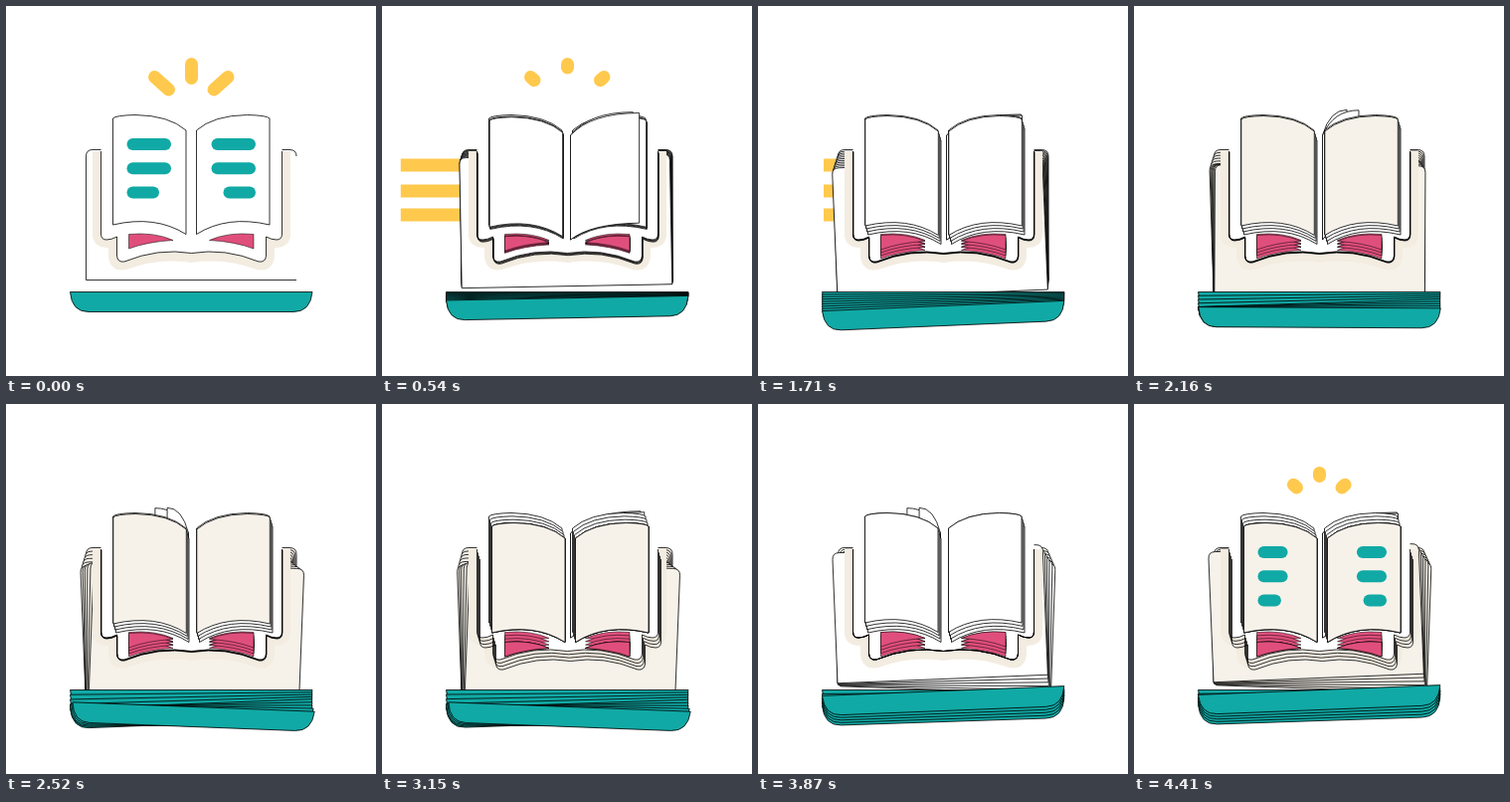
These frames come from a looping animation (372x372 px, 4.5 s). An HTML page with a canvas:

```html
<!DOCTYPE html>
<html>
<head>
<meta charset="utf-8">
<style>
html, body { margin: 0; width: 100%; height: 100%; overflow: hidden; background: #fff; }
canvas { display: block; }
</style>
</head>
<body>
<canvas id="stage" width="372" height="372"></canvas>
<script>
const ctx = document.getElementById('stage').getContext('2d');
const TEAL = '#11a9a5', YELLOW = '#ffc94d', PINK = '#e04f7c', BAND = '#f3ece1', PAPER = '#f6f2ea';
const STEP = 90, COUNT = 50;

// step, laptop dy, tilt, echo dy, base echo tilt, screen echo tilt, book dy, book echo dy
const KEYS = [
  [0, 0, 0, 0, 0, 0, 0, 0],
  [13, 14, -2.4, 7, -1.2, -1.2, 5, 10],
  [19, 14, -2.4, 7, -1.2, -1.2, 1, 10],
  [28, 17, 2.2, 14, -2.3, -2.3, 1, 10],
  [35, 17, 2.2, 14, -2, -2, 10, 10],
  [43, 1, -2.3, 12, -1.9, 2, 0, 10],
  [49, 0, -2.3, 11, -1.9, 2, 10, 10]
];

const mix = (a, b, k) => a + (b - a) * k;
const clamp = v => Math.max(0, Math.min(1, v));

function poseAt(f) {
  let i = 0;
  while (i < KEYS.length - 2 && f > KEYS[i + 1][0]) i++;
  const a = KEYS[i], b = KEYS[i + 1];
  const k = clamp((f - a[0]) / (b[0] - a[0])), e = k * k * (3 - 2 * k);
  return a.map((v, j) => mix(v, b[j], e));
}

// rest -> echo -> present
const along = (echo, now, s) => s < 0.5 ? echo * s * 2 : mix(echo, now, s * 2 - 1);

function paint(d, fill, stroke = '#000', width = 0.8) {
  const p = new Path2D(d);
  if (fill) { ctx.fillStyle = fill; ctx.fill(p); }
  if (stroke) { ctx.strokeStyle = stroke; ctx.lineWidth = width; ctx.stroke(p); }
}

function shifted(x, y, deg, draw) {
  ctx.save();
  ctx.translate(186 + x, 290 + y);
  ctx.rotate(deg * Math.PI / 180);
  ctx.translate(-186, -290);
  draw();
  ctx.restore();
}

// Leaning right also slides the laptop right
const leaning = (y, deg, draw) => shifted(Math.max(0, deg), y, deg, draw);

function bothSides(draw) {
  draw();
  ctx.save();
  ctx.translate(372.5, 0);
  ctx.scale(-1, 1);
  draw();
  ctx.restore();
}

function bar(x1, y1, x2, y2, color, width, cap = 'round') {
  ctx.strokeStyle = color;
  ctx.lineWidth = width;
  ctx.lineCap = cap;
  ctx.beginPath();
  ctx.moveTo(x1, y1);
  ctx.lineTo(x2, y2);
  ctx.stroke();
  ctx.lineCap = 'butt';
}

function screen(fill, closed) {
  paint('M80.5 275.5V151Q80.5 144.5 87 144.5H285Q292 144.5 292 151V275.5Z', fill, null);
  paint('M292 275.5H80.5V151Q80.5 144.5 87 144.5H96M277 144.5H285Q292 144.5 292 151' + (closed ? 'V275.5' : ''));
}

function base() {
  paint('M64.5 287.5H308Q306 307.5 289 307.5H83Q66 307.5 64.5 287.5Z', TEAL);
}

const COVER = 'V229Q95.5 235 101 235Q106 235 111.5 232V251Q112 258 119 257Q153 243 186.5 248.5Q220 243 254 257Q261 258 261.5 251V232Q267 235 272 235Q277.5 235 277.5 229V';

function coverFill() {
  paint('M87 146V229Q87 243 103 243V252Q105 268 121 265Q153 253 186.5 258Q220 253 252 265Q268 268 270 252V243Q286 243 286 229V146Z', BAND, null);
  paint('M95.5 136' + COVER + '136Z', '#fff', null);
}

const coverLine = () => paint('M95.5 146' + COVER + '146', null);

function page(fill) {
  paint('M107.5 113Q110 110 130 109.5Q164 110 181 125V229.5Q150 210 107.5 220Z', fill);
}

function turningPage(p) {
  if (p < 0) return;
  p %= 1;
  const side = Math.cos(Math.PI * p), lift = Math.sin(Math.PI * p) * 6;
  const x = 186.5 + 79 * side, spine = 186.5 + (side < 0 ? -3 : 3);
  const mid = mix(x, spine, 0.7), top = 110 - lift;
  paint(`M${x} ${top}Q${mid} ${top} ${spine} 130V235Q${mid} ${220 - lift / 2} ${x} ${219 - lift / 3}Z`, '#fff');
}

function textLines(k) {
  bothSides(() => [160, 160, 148].forEach((end, i) => {
    const y = 139 + i * 24.3;
    bar(127.5, y, mix(127.5, end, k), y, TEAL, 12);
  }));
}

function rays(from, to) {
  const ray = (x1, y1, x2, y2) => bar(mix(x1, x2, from), mix(y1, y2, from),
    mix(x1, x2, to), mix(y1, y2, to), YELLOW, 13);
  ray(186.5, 72.5, 186.5, 58.5);
  bothSides(() => ray(163.5, 84, 149.5, 71.5));
}

function sideRays(f) {
  if (f < 1 || f > 21) return;
  const x = f < 5 ? mix(78, 7, f / 5) : mix(7, 66, clamp((f - 5) / 5));
  [160, 186, 210].forEach(y => bar(x, y, 84, y, YELLOW, 13, 'butt'));
}

function draw(f) {
  const [, dy, tilt, echoDy, echoTilt, screenTilt, book, echoBook] = poseAt(f);
  const fill = f >= 24 && f < 41 || f >= 46 ? PAPER : '#fff';
  const echoes = (count, paintOne) => {
    for (let i = f ? 0 : count; i <= count; i++) paintOne(i / count);
  };
  const laptopY = s => along(echoDy, dy, s);
  const bookY = s => along(echoBook, book, s);
  const withBook = (y, part) => shifted(y * 0.3, y, 0, part);

  ctx.fillStyle = '#fff';
  ctx.fillRect(0, 0, 372, 372);
  sideRays(f);
  echoes(10, s => leaning(laptopY(s), along(screenTilt, tilt, s), () => screen(fill, f > 0)));
  coverFill();
  echoes(3, s => withBook(book * s, coverLine));
  echoes(8, s => leaning(laptopY(s), along(echoTilt, tilt, s), base));
  echoes(6, s => shifted(0, bookY(s), 0, () => bothSides(() =>
    paint('M123.5 229.5Q149 227 168 235.5Q142 237 123.5 244Z', PINK, '#000', 0.5))));

  const turn = () => [-0.8, 0].forEach(lead => turningPage((f - 4 - lead) / 15));
  if (f >= 16) turn();
  echoes(6, s => withBook(bookY(s), () => bothSides(() => page(s < 1 ? '#fff' : fill))));
  if (f < 16) turn();

  const words = f < 6 ? 1 - f / 6 : (f - 44) / 9;
  if (words > 0) withBook(book, () => textLines(words));
  if (f < 8) rays(f / 8, 1);
  else if (f > 47) rays(0, (f - 47) / 9);
}

function tick() {
  draw(Math.floor(performance.now() / STEP) % COUNT);
  requestAnimationFrame(tick);
}
tick();
</script>
</body>
</html>
```
